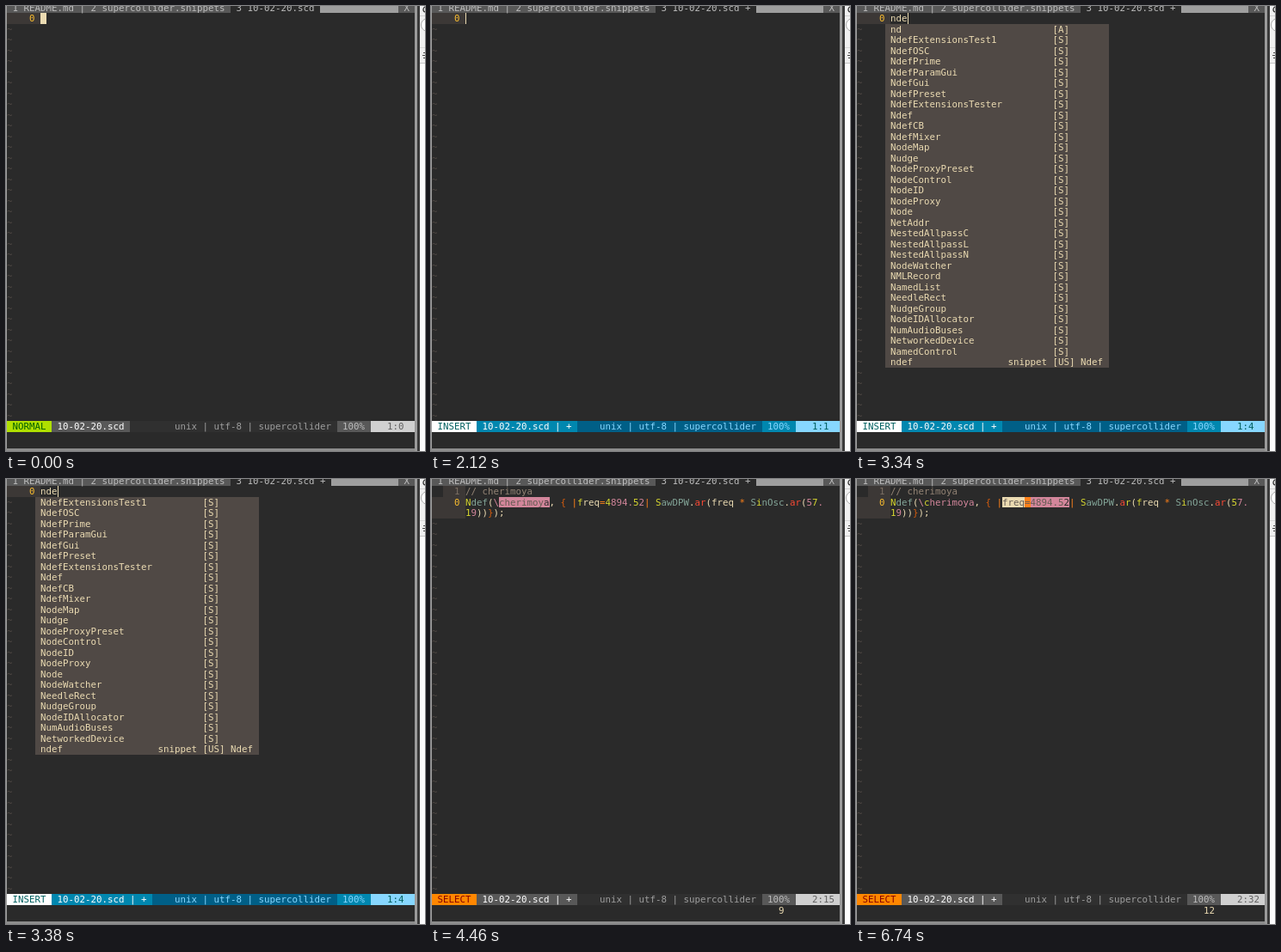
Write an HTML page that moves like this. It is 487 px wide and 518 px high and loops after 8000 ms.

```html
<!DOCTYPE html>
<html>
<head>
<meta charset="utf-8">
<title>Editor snippet</title>
<style>
html, body { margin: 0; width: 100%; height: 100%; overflow: hidden; background: #2a2a2a; }
svg { display: block; }
text { font: 10.8px "DejaVu Sans Mono", monospace; white-space: pre; }
rect { shape-rendering: crispEdges; }
</style>
</head>
<body>
<svg id="stage" width="487" height="518" viewBox="0 0 487 518"></svg>
<script>
const LOOP = 8000, CW = 6.5, RH = 12.5, LEFT = 1, TOP = 8.25, COLS = 73;
const BG = '#2a2a2a', FG = '#ebdbb2', GUTTER = '#3c3836', YELLOW = '#fabd2f', ORANGE = '#fe8019',
  RED = '#fb4934', PINK = '#d3869b', BLUE = '#83a598', BRACE = '#d65d0e', HINT = '#d7d72f', VISUAL = '#665c54';

const rect = (x, y, w, h, fill) => `<rect x="${x}" y="${y}" width="${w}" height="${h}" fill="${fill}"/>`;
const xAt = col => LEFT + col * CW;
const yAt = row => TOP + row * RH;
const fillCells = (col, row, cols, rows, fill) => rect(xAt(col), yAt(row), cols * CW, rows * RH, fill);

function put(col, row, text, fg, bg, bold) {
  const back = bg ? fillCells(col, row, text.length, 1, bg) : '';
  return back + `<text xml:space="preserve" x="${xAt(col)}" y="${yAt(row) + 10}" fill="${fg}"` +
    `${bold ? ' font-weight="700"' : ''}>${text}</text>`;
}

const THEMES = {
  NORMAL: { mode: ['#005f00', '#afdf00'], file: ['#ffffff', '#585858'], mid: ['#9e9e9e', '#303030'],
    percent: ['#bcbcbc', '#585858'], pos: ['#606060', '#d0d0d0'] },
  INSERT: { mode: ['#005f5f', '#ffffff'], file: ['#ffffff', '#0087af'], mid: ['#87d7ff', '#005f87'],
    percent: ['#87d7ff', '#0087af'], pos: ['#005f5f', '#87d7ff'] }
};
THEMES.SELECT = { ...THEMES.NORMAL, mode: ['#870000', '#ff8700'] };

const CODE = [
  ['Ndef', BLUE], ['(', FG], ['\\cherimoya', PINK], [', ', FG], ['{ ', BRACE], ['|', ORANGE],
  ['freq', FG], ['=', ORANGE], ['4894.52', PINK], ['| ', ORANGE], ['SawDPW', BLUE], ['.', FG],
  ['ar', RED], ['(freq ', FG], ['* ', ORANGE], ['SinOsc', BLUE], ['.', FG], ['ar', RED], ['(', FG],
  ['57.19', PINK], ['))', FG], ['}', BRACE], [');', FG]
].flatMap(([s, color]) => [...s].map(ch => ({ ch, color })));
const WRAP = 64;

// Marks, per word, the character that a single find-key press can reach.
function hints(cursor) {
  const marks = new Set();
  for (const dir of [1, -1]) {
    const seen = new Set();
    let own = true, mark = -1;
    for (let i = cursor + dir; ; i += dir) {
      const ch = CODE[i] ? CODE[i].ch : ' ';
      if (/\w/.test(ch)) {
        if (!own && !seen.has(ch) && (mark < 0 || dir < 0)) mark = i;
        seen.add(ch);
      } else {
        if (mark >= 0) marks.add(mark);
        mark = -1;
        own = false;
      }
      if (!CODE[i]) break;
    }
  }
  return marks;
}

const words = s => s.split(' ').map(w => [w, '[S]']);
const PREFIXED = 'NdefExtensionsTest1 NdefOSC NdefPrime NdefParamGui NdefGui NdefPreset NdefExtensionsTester Ndef NdefCB NdefMixer';
const SNIPPET = [['ndef', '[US] Ndef', 'snippet']];
const MENUS = {
  nd: [['nd', '[A]'], ...words(PREFIXED + ' NodeMap Nudge NodeProxyPreset NodeControl NodeID NodeProxy Node' +
    ' NetAddr NestedAllpassC NestedAllpassL NestedAllpassN NodeWatcher NMLRecord NamedList NeedleRect' +
    ' NudgeGroup NodeIDAllocator NumAudioBuses NetworkedDevice NamedControl'), ...SNIPPET],
  nde: [...words(PREFIXED + ' NodeMap Nudge NodeProxyPreset NodeControl NodeID NodeProxy Node' +
    ' NodeWatcher NeedleRect NudgeGroup NodeIDAllocator NumAudioBuses NetworkedDevice'), ...SNIPPET],
  ndef: [...words(PREFIXED), ...SNIPPET]
};

const typing = (text, menu, lit) => ({ mode: 'INSERT', text, menu, lit, dirty: true });
const select = (from, to) => ({ mode: 'SELECT', from, to, code: true, dirty: true });
const normal = to => ({ mode: 'NORMAL', to, code: true, dirty: true });

const STATES = [
  [0, { mode: 'NORMAL', text: '' }],
  [720, { mode: 'INSERT', text: '' }],
  [1540, typing('n')],
  [2120, typing('')],
  [2680, typing('n')],
  [2820, typing('nd')],
  [2940, typing('nd', 'nd')],
  [3340, typing('nde', 'nd')],
  [3380, typing('nde', 'nde')],
  [3500, typing('ndef', 'ndef')],
  [3620, typing('ndef', 'ndef', true)],
  [4340, typing('ndef')],
  [4460, select(7, 15)],
  [5740, normal(15)],
  [5900, select(18, 69)],
  [6160, normal(69)],
  [6280, select(20, 33)],
  [6600, normal(33)],
  [6740, select(21, 32)]
];

function drawTabs(s) {
  const tab = ` 3 10-02-20.scd ${s.dirty ? '+ ' : ''}`;
  return fillCells(0, -1, COLS, 1, '#9e9e9e') +
    put(0, -1, ' 1 README.md | 2 supercollider.snippets ', '#bcbcbc', '#585858') +
    put(40, -1, tab, '#bcbcbc', BG) + put(70, -1, ' X ', '#bcbcbc', '#585858');
}

function drawStatus(s) {
  const t = THEMES[s.mode];
  const pos = s.code ? `2:${s.to}` : `1:${s.mode === 'INSERT' ? s.text.length + 1 : 0}`;
  return fillCells(0, 38, COLS, 1, t.mid[1]) +
    put(0, 38, ` ${s.mode} `, ...t.mode, true) +
    put(8, 38, ` 10-02-20.scd ${s.dirty ? '| + ' : ''}`, ...t.file) +
    put(30, 38, 'unix | utf-8 | supercollider', t.mid[0]) +
    put(59, 38, ' 100% ', ...t.percent) +
    put(65, 38, `   ${pos}`.padEnd(8), ...t.pos);
}

function drawCode(s) {
  const marks = hints(s.to - 1);
  let out = fillCells(2, 0, 4, 1, GUTTER) + fillCells(0, 1, 6, 2, GUTTER) +
    put(4, 0, '1', '#7c6f64') + put(4, 1, '0', YELLOW) + put(6, 0, '// cherimoya', '#928374');
  CODE.forEach(({ ch, color }, i) => {
    const n = i + 1, row = i < WRAP ? 1 : 2, col = 6 + i % WRAP;
    if (n === s.to) out += put(col, row, ch, BG, color);
    else if (n >= s.from && n < s.to) out += put(col, row, ch, VISUAL, color);
    else if (marks.has(i)) out += put(col, row, ch, HINT, null, true);
    else out += put(col, row, ch, color);
  });
  if (s.mode === 'SELECT') out += put(62, 39, String(s.to - s.from + 1), FG);
  return out;
}

function drawTyping(s) {
  let out = fillCells(0, 0, 6, 1, GUTTER) + put(4, 0, '0', YELLOW) +
    put(6, 0, s.text, s.lit ? BG : FG, s.lit && YELLOW);
  out += rect(xAt(6 + s.text.length), TOP, s.mode === 'INSERT' ? 1 : CW, RH, FG);
  if (s.menu) {
    const items = MENUS[s.menu];
    out += fillCells(5, 1, 40, items.length, '#504945');
    items.forEach(([name, kind, note], i) => {
      out += put(6, i + 1, name, FG) + put(35, i + 1, kind, FG);
      if (note) out += put(27, i + 1, note, FG);
    });
  }
  return out;
}

function drawFrame() {
  return rect(0, 0, 1, 518, '#a0a0a0') + rect(0, 515, 478, 3, '#8c8c8c') +
    rect(475, 0, 3, 518, '#9a9a9a') + rect(478, 0, 3, 518, '#3a3a3a') +
    rect(481, 0, 6, 518, '#fcfcfc') + rect(481, 0, 6, 66, '#f0f0f0') +
    rect(481, 11, 6, 1, '#d0d0d0') + rect(481, 48, 6, 1, '#d8d8d8') + rect(481, 66, 6, 1, '#c4c4c4') +
    '<circle cx="488" cy="4" r="3" fill="none" stroke="#333" stroke-width="1.3"/>' +
    '<circle cx="490" cy="22" r="7.5" fill="#fff" stroke="#aaa"/>' +
    rect(485, 54, 2, 1, '#444') + rect(484, 57, 3, 1, '#444') + rect(485, 60, 2, 1, '#444');
}

function draw(s) {
  let out = rect(0, 0, 487, 518, BG);
  for (let row = s.code ? 3 : 1; row < 38; row++) out += put(0, row, '~', '#504945');
  return out + (s.code ? drawCode(s) : drawTyping(s)) + drawTabs(s) + drawStatus(s) + drawFrame();
}

const stage = document.getElementById('stage');
const start = performance.now();
let shown = null;
function update(now) {
  const t = Math.max(0, now - start) % LOOP;
  const state = STATES.filter(([at]) => at <= t).pop()[1];
  if (state !== shown) {
    stage.innerHTML = draw(state);
    shown = state;
  }
  requestAnimationFrame(update);
}
update(start);
</script>
</body>
</html>
```
